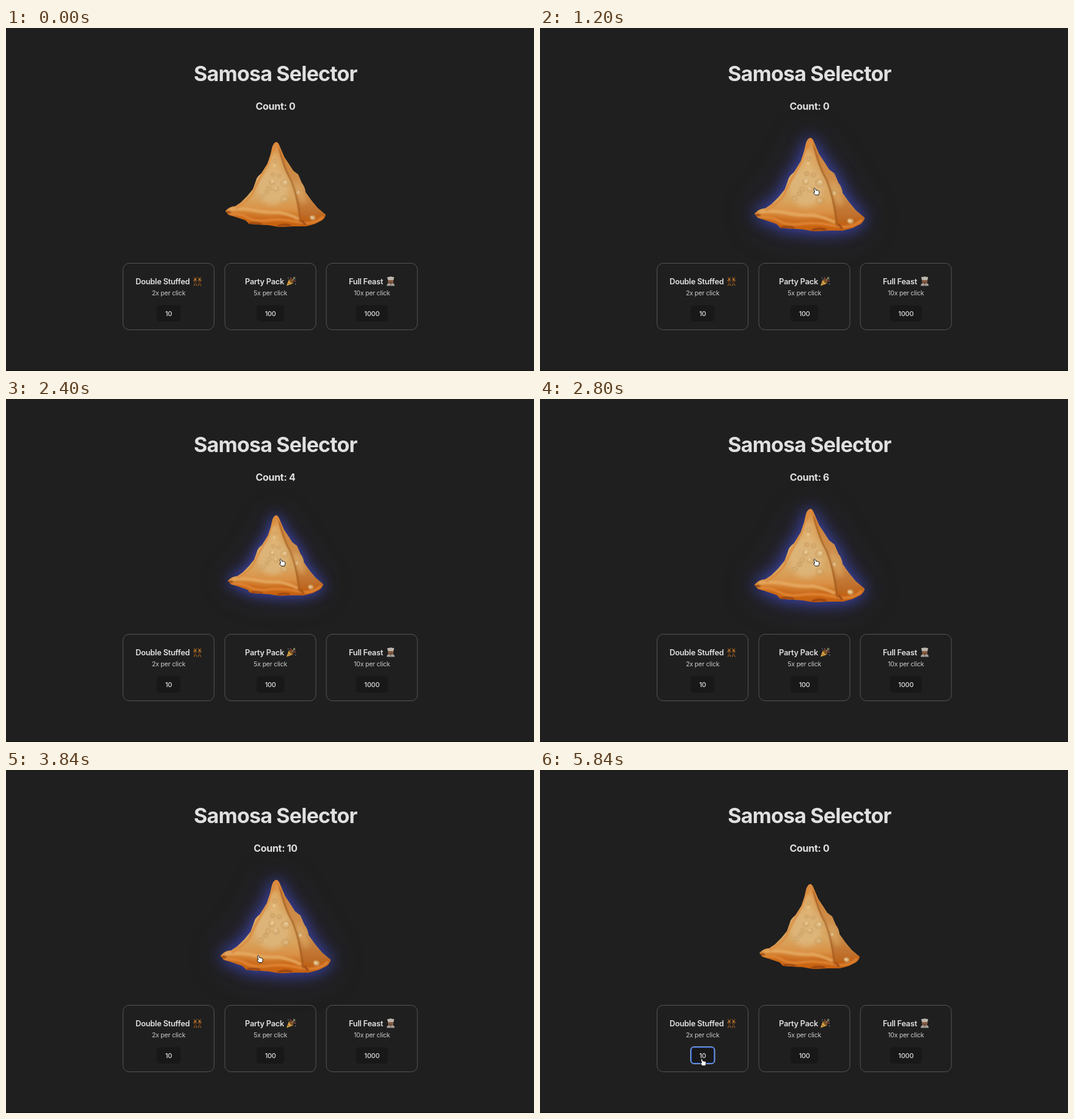
An HTML page for the animation above (5920 ms loop, 864 by 562 pixels).

```html
<!DOCTYPE html>
<html lang="en">
<head>
<meta charset="utf-8">
<title>Samosa Selector</title>
<style>
  html, body { margin: 0; width: 100%; height: 100%; overflow: hidden; background: #1f1f1f; }
  svg { display: block; }
  text { font-family: Inter, sans-serif; font-optical-sizing: none; letter-spacing: -.02em; fill: #e0e0e0; }
  .title { font-size: 34px; font-weight: 700; letter-spacing: -.024em; }
  .count { font-size: 16px; font-weight: 700; }
  .name { font-size: 12.8px; font-weight: 600; }
  .note { font-size: 10.5px; fill: #ccc; }
  .price { font-size: 11px; font-weight: 500; }
  .mid { text-anchor: middle; }
</style>
</head>
<body>
<svg width="864" height="562" viewBox="0 0 864 562">
  <defs>
    <linearGradient id="crust" x1="0" y1="0" x2="0" y2="1">
      <stop offset="0" stop-color="#d98d42"/>
      <stop offset=".3" stop-color="#d9a662"/>
      <stop offset=".65" stop-color="#d8a560"/>
      <stop offset=".8" stop-color="#da9145"/>
      <stop offset="1" stop-color="#c4641a"/>
    </linearGradient>
    <linearGradient id="side" x1="0" y1="0" x2="0" y2="1">
      <stop offset="0" stop-color="#d07c30"/>
      <stop offset=".55" stop-color="#cc9250"/>
      <stop offset="1" stop-color="#b95c17"/>
    </linearGradient>
    <linearGradient id="edge" x1="0" y1="1" x2="1" y2="0">
      <stop offset=".4" stop-color="#2f50e4"/>
      <stop offset=".7" stop-color="#6a74a8"/>
    </linearGradient>
    <filter id="soft" x="-40%" y="-40%" width="180%" height="180%"><feGaussianBlur stdDeviation="4"/></filter>
    <filter id="slight" x="-30%" y="-30%" width="160%" height="160%"><feGaussianBlur stdDeviation="1"/></filter>
    <path id="outline" d="M442 187Q437 188 435 198L433 207 428 222 418 238Q410 244 409 250L404 264 395 275 384 286 375 292Q366 292 359 300L364 306 374 309 392 315 398 321 412 322 430 323 447 326 470 325 490 325 505 321 517 315Q522 311 523 306L510 295 500 283 490 269Q489 260 484 254L478 240 470 234 463 223 455 211 447 192Q445 187 442 187Z"/>
    <clipPath id="shape"><use href="#outline"/></clipPath>
  </defs>

  <rect width="864" height="562" fill="#1f1f1f"/>
  <path d="M0 561.5H864" stroke="#111"/>
  <text class="title mid" x="441" y="87">Samosa Selector</text>
  <text class="count mid" id="count" x="441" y="134"></text>

  <g id="samosa">
    <use href="#outline" fill="url(#crust)"/>
    <g clip-path="url(#shape)">
      <path d="M443 187Q453 230 466 250 476 275 482 325H530V290L470 187Z" fill="url(#side)"/>
      <ellipse cx="436" cy="260" rx="26" ry="30" fill="#dfbb84" opacity=".7" filter="url(#soft)"/>
      <ellipse cx="439" cy="224" rx="8" ry="20" fill="#e2b778" opacity=".7" filter="url(#soft)"/>
      <ellipse cx="481" cy="270" rx="6" ry="20" fill="#dcaa66" opacity=".7" filter="url(#soft)" transform="rotate(-22 481 270)"/>
      <path d="M357 304Q385 302 405 307T450 308 480 312 526 306V330H357Z" fill="#c8600f" opacity=".75" filter="url(#soft)"/>
      <g filter="url(#slight)" fill="none">
        <path d="M368 297Q390 295 408 299T446 302Q466 306 477 312" stroke="#e6ac62" stroke-width="5" stroke-linecap="round" opacity=".8"/>
        <path d="M366 305Q384 304 396 311T430 315 478 318 519 309" stroke="#e18a3a" stroke-width="4" opacity=".8"/>
        <path d="M359 302H368M398 321Q408 317 418 321M444 325Q454 320 466 324M484 316 490 322" stroke="#8c3a10" stroke-width="2.5"/>
        <path d="M447 195Q454 228 465 247 477 272 482 319" stroke="#93501c" stroke-width="1.5"/>
        <path d="M437 193Q433 217 420 239T404 270 376 296" stroke="#dc8c3f" stroke-width="3"/>
        <path d="M437 203Q440 190 442 188 449 194 455 212" stroke="#dd883b" stroke-width="3"/>
        <g id="bubbles" fill="#dcb57a" stroke="#bf8d4c"/>
        <g fill="#f0d8a8">
          <circle cx="436" cy="251" r="2"/><circle cx="457" cy="252" r="2"/><circle cx="441" cy="262" r="1.6"/>
          <circle cx="478" cy="270" r="1.5"/><circle cx="500" cy="310" r="2"/><circle cx="439" cy="225" r="1.6"/>
        </g>
      </g>
    </g>
  </g>

  <g id="cards"></g>

  <!-- dancers -->
  <g fill="none" stroke-linecap="round">
    <g id="dancer">
      <path d="M308.5 410 307.5 408.5M311 410 312 408.5" stroke="#7a4d1c" stroke-width="1.3"/>
      <path d="M307 413.5 309 415.5 312 414.5M309.5 418.5 307.5 422M310.5 418.5 312 422" stroke="#a0642a" stroke-width="1.3"/>
      <path d="M309.7 414.5V418.5" stroke="#4a2f1a" stroke-width="3"/>
      <circle cx="309.7" cy="412" r="1.9" fill="#b06e2a"/>
    </g>
    <use href="#dancer" transform="matrix(-1 0 0 1 626.5 0)"/>
  </g>
  <!-- party popper -->
  <g transform="translate(0 .5)">
    <path d="M459 422 463 411 470 418Z" fill="#d8a548"/>
    <path d="M461 417 465 420M463 412 469 418" stroke="#a8702a" stroke-width="1.3"/>
    <ellipse cx="466.5" cy="414.5" rx="2" ry="4.5" transform="rotate(-45 466.5 414.5)" fill="#7d5526"/>
    <path d="M466 412Q468 410 465 408M469 414Q472 413 474 415" fill="none" stroke="#b8564c" stroke-width="1.2"/>
    <path d="M468 413 473 408" stroke="#c9a54c" stroke-width="1.2"/>
    <path d="M461 409h1.5M470 408h1.5M473 419h1.5M472 411h1.5" stroke="#6488a8" stroke-width="1.3"/>
  </g>
  <!-- cook -->
  <g transform="translate(0 .5)">
    <path d="M623 422Q623 417 629.5 417T636 422Z" fill="#a5a09a"/>
    <path d="M625 412H634V415Q633 419 629.5 419T625 415Z" fill="#8a5f45"/>
    <path d="M625 412.5 624 409Q623 407 626 407.5 629.5 406 633 407.5 636 407 635 409L634 412.5Z" fill="#bdb6ad"/>
    <path d="M627 414.5h1M631 414.5h1M628 417h3" stroke="#3d2a20"/>
    <path d="M629.5 419V422" stroke="#666"/>
  </g>

  <rect id="hoverEdge" x="247" y="454" width="38.5" height="27" rx="5" fill="none" stroke="url(#edge)" stroke-width="1.5"/>
  <g id="focusRing" fill="none">
    <rect x="247.5" y="454.5" width="37.5" height="26" rx="4.5" stroke="#2a62d8" stroke-width="1.6"/>
    <rect x="246.4" y="453.4" width="39.6" height="28" rx="5.5" stroke="#a9c6fb"/>
  </g>

  <path id="cursor" d="M-4-5.3Q-2.6-7-1.4-5L-.2-2Q1-3 2-1.7 3-2.5 3.8-1.2 5.3-1.3 5.3 1L4.600 4 4 6H-1.5L-4.600 2.200Q-4.800.5-2.600 1.200Z" fill="#fff" stroke="#0a0a0a"/>
</svg>

<script>
const LOOP = 5920, STEP = 80;
const $ = id => document.getElementById(id);

const cards = [
  [191.5, 'Double Stuffed', 2, 10, 39],
  [358.1, 'Party Pack', 5, 100, 45],
  [524.2, 'Full Feast', 10, 1000, 52]
];
const nameStarts = [212, 391, 561];
$('cards').innerHTML = cards.map(([x, name, factor, price, width], i) => {
  const mid = x + 74.6;
  return `<rect x="${x}" y="385.5" width="149" height="109" rx="10" fill="none" stroke="#555"/>
    <text class="name" x="${nameStarts[i]}" y="419.5">${name}</text>
    <text class="note mid" x="${mid}" y="437.5">${factor}x per click</text>
    <rect x="${mid - width / 2}" y="454" width="${width}" height="27" rx="5" fill="#181818"/>
    <text class="price mid" x="${mid}" y="472">${price}</text>`;
}).join('');

const bubbles = [[435, 253, 4], [456, 254, 6], [430, 263, 3.5], [442, 264, 4], [426, 270, 3],
  [456, 280, 5], [437, 240, 3], [447, 242, 3], [419, 277, 3.5], [478, 268, 3], [440, 218, 3], [502, 311, 4]];
$('bubbles').innerHTML = bubbles.map(([x, y, r]) =>
  `<ellipse cx="${x}" cy="${y}" rx="${r}" ry="${r * .85}"/>`).join('');

const ramp = (t, start, length) => {
  const u = Math.min(1, Math.max(0, (t - start) / length));
  return u * u * (3 - 2 * u);
};
const pulse = (t, on, off, length) => ramp(t, on, length) - ramp(t, off, length);
const mix = (a, b, u) => a + (b - a) * u;
const show = (id, on) => $(id).setAttribute('visibility', on ? 'visible' : 'hidden');

const HOLD = 120, RESET = 4960;
const presses = [1200, 1480, 1760, 2040, 2320, 2560, 2800, 3040, 3280, 3520];

function draw(t) {
  const hover = pulse(t, 620, 3840, 160);
  const press = Math.max(...presses.map(p => pulse(t, p, p + HOLD, STEP)));
  const scale = 1 + .1 * hover - .15 * press;
  $('samosa').setAttribute('transform', `translate(441 256) scale(${scale}) translate(-441 -256)`);
  $('samosa').style.filter = hover > 0
    ? `drop-shadow(0 0 12px rgba(66,84,225,${.85 * hover})) drop-shadow(0 0 24px rgba(80,60,150,${.3 * hover}))`
    : 'none';

  const clicks = presses.filter(p => t >= p + HOLD).length;
  $('count').textContent = `Count: ${t < RESET ? clicks : 0}`;

  const enter = ramp(t, 320, 480), leave = ramp(t, 3680, 560);
  const x = mix(mix(462, 452, enter), 267, leave);
  const y = mix(mix(532, 268, enter), 479, leave);
  $('cursor').setAttribute('transform', `translate(${x} ${y}) scale(.95)`);
  show('cursor', t >= 320);
  show('hoverEdge', t >= 4240 && t < RESET);
  show('focusRing', t >= RESET);
}

function tick(now) {
  draw(Math.floor(now % LOOP / STEP) * STEP);
  requestAnimationFrame(tick);
}
tick(performance.now());
</script>
</body>
</html>
```
